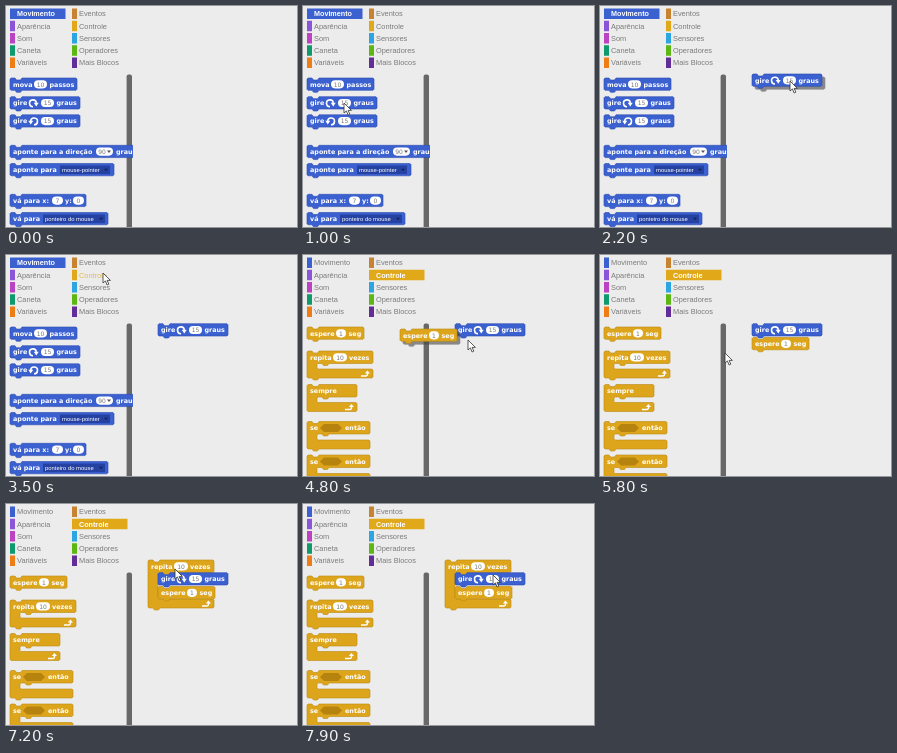
Recreate the animation shown at these times as an HTML page. Size 291x221 px, loop 8 s.

```html
<!DOCTYPE html>
<html lang="pt">
<head>
<meta charset="utf-8">
<style>
html, body { margin: 0; width: 100%; height: 100%; overflow: hidden; background: #ececec; }
svg { display: block; width: 291px; height: 221px; }
.cat { font: 7.4px "Liberation Sans", Arial, sans-serif; fill: #7b7b7b; }
.on { font-weight: bold; font-size: 7.2px; fill: #fff; }
.word { font: bold 6.4px "DejaVu Sans", sans-serif; fill: #fff; }
.num { font: 6px "DejaVu Sans", sans-serif; fill: #777; text-anchor: middle; }
.menu { font: 5.9px "Liberation Sans", Arial, sans-serif; fill: #fff; }
.held { filter: drop-shadow(3px 3px .6px rgba(70, 70, 70, .6)); }
</style>
</head>
<body>
<svg id="stage" viewBox="0 0 291 221"></svg>
<script>
const LOOP = 8000, STEP = 100;
const BLUE = { fill: '#3b60d0', edge: '#2b4bb0', dark: '#2542a2' };
const GOLD = { fill: '#dda51c', edge: '#bd8a12', dark: '#b5830e' };

const stage = document.getElementById('stage');

function add(parent, tag, attrs = {}, text) {
  const el = document.createElementNS('http://www.w3.org/2000/svg', tag);
  for (const k in attrs) el.setAttribute(k, attrs[k]);
  if (text !== undefined) el.textContent = text;
  parent.append(el);
  return el;
}

const place = (el, x, y) => el.setAttribute('transform', `translate(${x} ${y})`);
const show = (el, on) => el.setAttribute('visibility', on ? 'visible' : 'hidden');

// Block outlines: notch on top, bump below
const topEdge = (x, y, w) => `M${x} ${y + 1}l1-1h4l1.5 2h4l1.5-2H${w - 1}l1 1`;
const bump = (x, y) => `H${x + 12}l-1.5 2h-4l-1.5-2`;

function stackPath(w, h) {
  return `${topEdge(0, 0, w)}V${h - 1}l-1 1${bump(0, h)}H1l-1-1z`;
}

function mouthPath(w, gap, capped) {
  const low = 12.5 + gap, end = low + 9;
  return `${topEdge(0, 0, w)}V11.5l-1 1${bump(10, 12.5)}H11l-1 1V${low - 1}l1 1H${w - 1}l1 1` +
    `V${end - 1}l-1 1${capped ? '' : bump(0, end)}H1l-1-1z`;
}

const parts = {
  word: (g, c, x, s) => add(g, 'text', { class: 'word', x, y: 8.6 }, s),
  num(g, c, x, s, w) {
    add(g, 'rect', { x, y: 2.2, width: w, height: 8.2, rx: 4.1, fill: '#fff' });
    add(g, 'text', { class: 'num', x: x + w / 2, y: 8.5 }, s);
  },
  angle(g, c, x, s, w) {
    parts.num(g, c, x, '', w);
    add(g, 'text', { class: 'num', x: x + 6, y: 8.5 }, s);
    add(g, 'path', { d: `M${x + w - 6} 5.2h4l-2 2.6z`, fill: '#555' });
  },
  menu(g, c, x, s, w) {
    add(g, 'rect', { x, y: 2, width: w, height: 8.6, fill: c.dark });
    add(g, 'text', { class: 'menu', x: x + 2, y: 8.3 }, s);
    add(g, 'path', { d: `M${x + w - 6} 5.2h4l-2 2.6z`, fill: '#14245f' });
  },
  turn(g, c, x, dir) {
    const a = add(g, 'g', { transform: `translate(${x} 6.4) scale(${dir} 1)` });
    add(a, 'path', { d: 'M-.5 3.6A3.4 3.4 0 1 1 2.8-.2', fill: 'none', stroke: '#fff', 'stroke-width': 1.6 });
    add(a, 'path', { d: 'M.2-.4h5L2.8 3.4z', fill: '#fff' });
  },
  hex: (g, c, x, w) => add(g, 'path', { d: `M${x} 6.5l4-4h${w - 8}l4 4l-4 4h${8 - w}z`, fill: c.dark }),
  loop(g, c, x, y) {
    const a = add(g, 'g', { transform: `translate(${x} ${y})` });
    add(a, 'path', { d: 'M-4 2h4.5q2 0 2-2v-1', fill: 'none', stroke: '#fff', 'stroke-width': 1.4 });
    add(a, 'path', { d: 'M-.2-.6h5.2L2.4-3.6z', fill: '#fff' });
  }
};

function block(parent, color, d, list, x = 0, y = 0) {
  const g = add(parent, 'g');
  add(g, 'path', { d, fill: color.fill, stroke: color.edge, 'stroke-width': .6 });
  for (const [kind, ...args] of list) parts[kind](g, color, ...args);
  place(g, x, y);
  return g;
}

const move = (parent, w, list, x, y) => block(parent, BLUE, stackPath(w, 12.3), list, x, y);

const spin = (parent, dir, x, y) => move(parent, 70,
  [['word', 3, 'gire'], ['turn', 23.5, dir], ['num', 31, '15', 13], ['word', 46.5, 'graus']], x, y);

const wait = (parent, x, y) => block(parent, GOLD, stackPath(57, 12.3),
  [['word', 3, 'espere'], ['num', 29, '1', 10], ['word', 41.5, 'seg']], x, y);

const repeat = (parent, gap, x, y) => block(parent, GOLD, mouthPath(66, gap),
  [['word', 3, 'repita'], ['num', 26, '10', 14], ['word', 42, 'vezes'], ['loop', 58, 17.5 + gap]], x, y);

const branch = (parent, x, y) => block(parent, GOLD, mouthPath(63, 6),
  [['word', 3, 'se'], ['hex', 13, 22], ['word', 38, 'então']], x, y);

// Scroll bar
add(stage, 'rect', { x: 120.6, y: 68.5, width: 5.4, height: 160, rx: 2, fill: '#686868' });

// Categories
const CATS = [
  ['Movimento', BLUE.fill], ['Aparência', '#8a55d7'], ['Som', '#bb42c3'], ['Caneta', '#0e9a6c'], ['Variáveis', '#ee7d16'],
  ['Eventos', '#c88330'], ['Controle', '#e1a91a'], ['Sensores', '#2ca5e2'], ['Operadores', '#5cb712'], ['Mais Blocos', '#632d99']
].map(([name, fill], i) => {
  const x = i < 5 ? 4 : 66, y = 2.5 + (i % 5) * 12.25;
  const bar = add(stage, 'rect', { x, y, width: 5, height: 10.5, fill });
  const label = add(stage, 'text', { class: 'cat', x: x + 7, y: y + 7.9 }, name);
  return { bar, label };
});

function select(cat, on) {
  cat.bar.setAttribute('width', on ? 55.5 : 5);
  cat.label.setAttribute('class', on ? 'cat on' : 'cat');
}

// Palettes
const clip = add(add(stage, 'defs'), 'clipPath', { id: 'pane' });
add(clip, 'rect', { x: 0, y: 60, width: 127, height: 161 });
const motion = add(stage, 'g', { 'clip-path': 'url(#pane)' });
const control = add(stage, 'g', { 'clip-path': 'url(#pane)' });

move(motion, 67, [['word', 3, 'mova'], ['num', 24, '10', 13], ['word', 39.5, 'passos']], 4, 72);
spin(motion, 1, 4, 90.7);
spin(motion, -1, 4, 108.8);
move(motion, 130, [['word', 3, 'aponte para a direção'], ['angle', 86, '90', 17], ['word', 106, 'graus']], 4, 139.3);
move(motion, 104, [['word', 3, 'aponte para'], ['menu', 50, 'mouse-pointer', 50]], 4, 157.5);
move(motion, 76, [['word', 3, 'vá para x:'], ['num', 42, '7', 11], ['word', 55, 'y:'], ['num', 63, '0', 11]], 4, 188.3);
move(motion, 98, [['word', 3, 'vá para'], ['menu', 33, 'ponteiro do mouse', 62]], 4, 206.5);

wait(control, 4, 72);
repeat(control, 5.5, 4, 96);
block(control, GOLD, mouthPath(50, 5.5, true), [['word', 3, 'sempre'], ['loop', 42, 23]], 4, 129.5);
branch(control, 4, 166.5);
branch(control, 4, 200);

// Script area
const wrap = repeat(stage, 26.5, 142, 56);
const turnBlock = spin(stage, 1, 0, 0);
const waitBlock = wait(stage, 0, 0);
const repBlock = repeat(stage, 5.5, 0, 0);
const cursor = add(stage, 'path', {
  d: 'M0 0V10L2.4 7.9L4.1 12L5.8 11.2L4.1 7.4H7.4Z', fill: '#fff', stroke: '#333', 'stroke-width': .8
});

// Tracks: [ms, x, y]
const CURSOR = [
  [0, 310, 112], [100, 285, 110], [500, 125, 103], [800, 52, 98], [1000, 41, 97], [1200, 41, 97],
  [1500, 92, 90], [1800, 164, 80], [2200, 190, 75], [2600, 190, 76], [2900, 178, 66], [3200, 122, 32],
  [3500, 97, 18], [3800, 97, 19], [4100, 68, 50], [4400, 40, 77], [4600, 41, 78], [4800, 165, 85],
  [5000, 187, 90], [5500, 188, 90], [5800, 125, 98], [6100, 48, 103], [6300, 30, 103], [6500, 31, 103],
  [6800, 149, 64], [7000, 168, 62], [7200, 169, 65], [7500, 203, 82], [7700, 200, 79], [7900, 190, 71]
];
const TURN = [[1200, 4, 90.7], [1500, 55, 83], [1800, 126, 73], [2200, 152, 68], [2400, 152, 68.7]];
const WAIT = [[4600, 4, 72], [4700, 42, 72], [4800, 97, 74], [5000, 150, 82], [5200, 152, 82.5]];
const REP = [[6500, 4, 96], [6600, 22, 87], [6800, 84, 59], [7000, 138, 54], [7100, 142, 56]];

function at(track, t) {
  const i = track.findIndex(k => k[0] > t);
  if (i < 0) return track[track.length - 1].slice(1);
  if (i === 0) return track[0].slice(1);
  const [a, b] = [track[i - 1], track[i]], f = (t - a[0]) / (b[0] - a[0]);
  return [a[1] + (b[1] - a[1]) * f, a[2] + (b[2] - a[2]) * f];
}

function carry(el, track, t, gone = LOOP) {
  const start = track[0][0], drop = track[track.length - 1][0];
  show(el, t > start && t < gone);
  el.setAttribute('class', t < drop ? 'held' : '');
  place(el, ...at(track, t));
}

function render(t) {
  const inControl = t >= 3700;
  select(CATS[0], !inControl);
  select(CATS[6], inControl);
  CATS[6].label.style.fill = t >= 3400 && !inControl ? '#e8b94a' : '';
  show(motion, !inControl);
  show(control, inControl);
  carry(turnBlock, TURN, t);
  carry(waitBlock, WAIT, t);
  carry(repBlock, REP, t, 7200);
  show(wrap, t >= 7200);
  place(cursor, ...at(CURSOR, t));
}

const begin = performance.now();
function tick() {
  const t = (performance.now() - begin) % LOOP;
  render(Math.floor(t / STEP) * STEP);
  requestAnimationFrame(tick);
}
tick();
</script>
</body>
</html>
```
